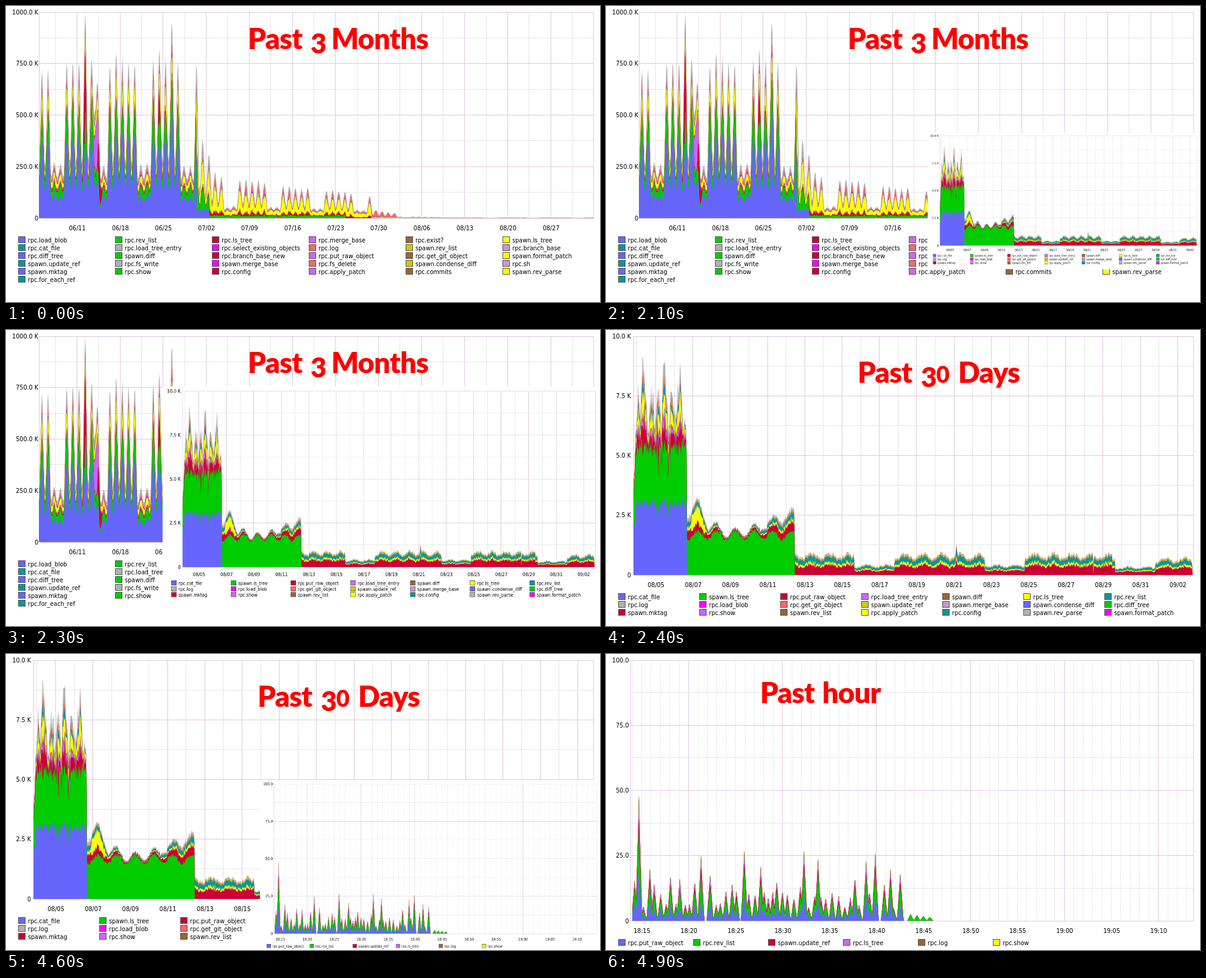
An HTML page with a canvas for the animation above (6.9 s loop, 975 by 487 pixels).

```html
<!DOCTYPE html>
<html lang="en">
<head>
<meta charset="utf-8">
<title>Call volume</title>
<style>
html, body { margin: 0; width: 100%; height: 100%; overflow: hidden; background: #fff; }
canvas { display: block; }
</style>
</head>
<body>
<canvas id="stage" width="975" height="487"></canvas>
<script>
const W = 975, H = 487, LOOP = 6900, RIGHT = 965, TOP = 10;
const C = {
  blue: '#6666ff', green: '#00cc00', crimson: '#cc0033', violet: '#cc66ff',
  brown: '#996633', yellow: '#ffff00', teal: '#009999', gray: '#b0b0b0',
  magenta: '#ff00ff', coral: '#ff6666', olive: '#cccc00', mauve: '#c898c8'
};
const CYCLE = Object.values(C);
const LAYERS = ['blue', 'green', 'crimson', 'violet', 'brown', 'yellow', 'teal', 'magenta', 'olive', 'coral', 'gray'];

function seeded(s) {
  return () => {
    s = (s + 0x6D2B79F5) | 0;
    let t = Math.imul(s ^ (s >>> 15), 1 | s);
    t = (t + Math.imul(t ^ (t >>> 7), 61 | t)) ^ t;
    return ((t ^ (t >>> 14)) >>> 0) / 4294967296;
  };
}

const bump = (x, c, w) => Math.max(0, 1 - Math.abs(x - c) / w);
const wave = (x, peak, period) => Math.cos((x - peak) / period * 2 * Math.PI);

// Piecewise linear curve through [x, y] pairs
function curve(pts, x) {
  let i = 1;
  while (i < pts.length - 1 && pts[i][0] < x) i++;
  const [x0, y0] = pts[i - 1], [x1, y1] = pts[i];
  return y0 + (y1 - y0) * Math.min(1, Math.max(0, (x - x0) / (x1 - x0)));
}

// Shares a total among named layers, each share jittered
function split(total, mix, rnd, jitter = 0.8) {
  const parts = {};
  let sum = 0;
  for (const name in mix) {
    const j = name === 'blue' ? jitter * 0.2 : jitter;
    sum += parts[name] = mix[name] * (1 + (rnd() - 0.5) * j);
  }
  for (const name in parts) parts[name] *= total / sum;
  return parts;
}

// rows: [x, heights]; the highest sums are painted first
function stack(g, rows, base) {
  const sums = rows.map(([x, h]) => [x, LAYERS.reduce((s, n) => s + (h[n] || 0), 0), h]);
  for (const name of [...LAYERS].reverse()) {
    g.beginPath();
    g.moveTo(rows[0][0], base);
    for (const row of sums) {
      g.lineTo(row[0], base - row[1]);
      row[1] -= row[2][name] || 0;
    }
    g.lineTo(rows[rows.length - 1][0], base);
    g.fillStyle = C[name];
    g.fill();
  }
}

function quarterRows() {
  const rnd = seeded(7), rows = [], size = 10.15;
  const level = [[0, 254], [20, 266], [25, 255], [26, 128], [28, 80], [30, 52], [32, 62], [53, 38], [54, 13], [58, 7], [59, 2.5], [68, 0.5]];
  const weekend = i => i % 7 === 2 || i % 7 === 3;
  const days = Array.from({ length: 92 }, (_, i) =>
    curve(level, i) * (weekend(i) ? 0.34 : 1) * (0.95 + rnd() * 0.1)
    + 80 * bump(i, 7, 1) + 55 * bump(i, 21, 1) + 135 * bump(i, 9, 1));
  const work = { blue: .52, green: .17, crimson: .02, violet: .01, brown: .025, yellow: .1, teal: .01, magenta: .01, coral: .04, gray: .1 };
  const rest = { blue: .44, green: .17, crimson: .03, violet: .02, brown: .03, yellow: .13, teal: .01, magenta: .03, coral: .05, gray: .1 };
  const july = { crimson: .08, brown: .04, yellow: .46, teal: .03, magenta: .02, coral: .13, gray: .12 };
  const late = { brown: .02, yellow: .12, teal: .06, coral: .6, gray: .06 };
  const tail = { yellow: .4, teal: .2, olive: .3, gray: .1 };

  for (let x = 54; x <= RIGHT; x++) {
    const t = (x - 59) / size, i = Math.max(0, Math.round(t)), f = t - i;
    const j = Math.max(0, i + (f < 0 ? -1 : 1));
    const low = Math.min(days[i], days[j]) * (weekend(i) || weekend(j) ? 0.75 : 0.36);
    const sharp = x < 320 ? 1.1 : 0.9;
    const h = (low + (days[i] - low) * Math.cos(Math.PI * f) ** (2 * sharp)) * (0.97 + rnd() * 0.06);
    let mix;
    if (x < 334) {
      mix = { ...(weekend(i) ? rest : work) };
      mix.crimson += 0.5 * bump(x, 129, 4) + 0.25 * bump(x, 251, 2) + bump(x, 154, 4);
      mix.violet += 0.8 * bump(x, 148, 5);
      if (x > 312) Object.assign(mix, { blue: 14 / h, green: .25, yellow: .3, gray: .2 });
    } else if (x < 600) {
      mix = { green: x < 558 ? 4 / h : 0, ...july };
    } else {
      mix = x < 642 ? late : tail;
    }
    rows.push([x, split(h, mix, rnd)]);
  }
  return rows;
}

function monthRows() {
  const rnd = seeded(23), rows = [], day = 30.6;
  const busy = { crimson: .28, violet: .1, brown: .06, yellow: .24, teal: .1, olive: .04, coral: .06, gray: .18 };
  const mid = { crimson: .38, brown: .03, yellow: .14, teal: .24, olive: .06, coral: .03, gray: .12 };
  const calm = { crimson: .46, brown: .02, yellow: .12, teal: .26, olive: .08, gray: .06 };
  const hill = [[133, 100], [151, 118], [167, 84], [205, 66], [232, 72], [309, 102]];

  for (let x = 45; x <= 963; x++) {
    let h;
    if (x < 133) {
      const edge = Math.min(1, 0.6 + (x - 45) / 14);
      const spikes = [60, 95, 123].reduce((s, c) => s + 85 * bump(x, c, 4), 0);
      const total = (275 + 25 * wave(x, 53, 11) + 50 * (rnd() - 0.5) + spikes) * edge - (x > 125 ? 55 : 0);
      const dip = rnd() < 0.06 ? 0.82 : 1;
      const blue = (108 + rnd() * 22) * edge * dip, green = (78 + rnd() * 26) * edge * dip;
      h = { blue, green, ...split(Math.max(20, total - blue - green), busy, rnd, 1) };
    } else if (x < 310) {
      const green = (66 + 7 * wave(x, 151, day)) * (0.95 + rnd() * 0.1);
      const total = (curve(hill, x) + 9 * wave(x, 151, day)) * (0.95 + rnd() * 0.1);
      const mix = x > 139 && x < 163 ? { ...mid, yellow: .9 } : mid;
      h = { green, ...split(Math.max(4, total - green), mix, rnd) };
    } else {
      const weekend = (x - 408) % 214 >= 0 && (x - 408) % 214 < 66;
      const total = (weekend ? 15 : 31) * (x > 830 ? 0.8 : 1) * (1 + 0.14 * wave(x, 582, day))
        * (0.87 + rnd() * 0.26) + 20 * bump(x, 575, 2);
      h = split(x === 800 || x > 962 ? 2 : total, calm, rnd, 0.5);
    }
    rows.push([x, h]);
  }
  return rows;
}

function hourRows() {
  const rnd = seeded(41), rows = [], unit = 4.29;
  const tall = [[54, 48], [72, 20], [156, 25], [227, 27], [254, 21], [325, 27], [348, 24], [427, 23], [442, 26], [467, 20], [483, 18]];
  const peaks = [];
  const add = (x, v, mix) => peaks.push({ x, v, mix });
  const mix = v => ({
    blue: .28 + rnd() * .18, green: .32 + rnd() * .1, crimson: .06 + rnd() * .08,
    violet: .06 + rnd() * .12, brown: .05, yellow: v > 19 ? .03 : 0
  });
  for (const [x, v] of tall) add(x, v, mix(v));
  for (let x = 47; x < 492; x += 6 + rnd() * 5) {
    if (tall.every(p => Math.abs(p[0] - x) > 5)) add(x, 5 + 13 * rnd() ** 1.6, mix(0));
  }
  for (let x = 500; x < 540; x += 10.5) add(x, 2.5 - (x - 500) / 30, { green: 1 });

  for (let x = 43; x < 540; x++) {
    const value = p => p.v * bump(x, p.x, 5.5);
    const top = peaks.reduce((a, b) => value(b) > value(a) ? b : a);
    rows.push([x, split(value(top) * unit, top.mix, rnd, 0)]);
  }
  return rows;
}

const DAY = 864e5;
const charts = [
  {
    left: 54, base: 349, x0: 116.5, step: 70.7, parts: 2, ticks: 12, tickY: 369,
    start: Date.UTC(2014, 5, 11), unit: 7 * DAY, right: 53,
    max: 1000, suffix: ' K', cols: 6, pitch: 159, keyY: 385, rows: quarterRows,
    legend: 'rpc.load_blob rpc.rev_list rpc.ls_tree rpc.merge_base rpc.exist? spawn.ls_tree ' +
      'rpc.cat_file rpc.load_tree_entry rpc.select_existing_objects rpc.log spawn.rev_list rpc.branch_base ' +
      'rpc.diff_tree spawn.diff rpc.branch_base_new rpc.put_raw_object rpc.get_git_object spawn.format_patch ' +
      'spawn.update_ref rpc.fs_write spawn.merge_base rpc.fs_delete spawn.condense_diff rpc.sh ' +
      'spawn.mktag rpc.show rpc.config rpc.apply_patch rpc.commits spawn.rev_parse rpc.for_each_ref'
  },
  {
    left: 45, base: 403, x0: 81.5, step: 61.2, parts: 2, ticks: 15, tickY: 423,
    start: Date.UTC(2014, 7, 5), unit: 2 * DAY, right: 41,
    max: 10, suffix: ' K', cols: 7, pitch: 133, keyY: 439, rows: monthRows,
    legend: 'rpc.cat_file spawn.ls_tree rpc.put_raw_object rpc.load_tree_entry spawn.diff rpc.ls_tree rpc.rev_list ' +
      'rpc.log rpc.load_blob rpc.get_git_object spawn.update_ref spawn.merge_base spawn.condense_diff rpc.diff_tree ' +
      'spawn.mktag rpc.show spawn.rev_list rpc.apply_patch rpc.config spawn.rev_parse spawn.format_patch'
  },
  {
    left: 40, base: 439, x0: 58.5, step: 77.1, parts: 5, every: 10, first: 5, ticks: 12, tickY: 459,
    start: Date.UTC(2014, 8, 2, 18, 15), unit: 3e5, clock: true, right: 37.5,
    max: 100, suffix: '', cols: 6, pitch: 123, keyY: 475, rows: hourRows,
    legend: 'rpc.put_raw_object rpc.rev_list spawn.update_ref rpc.ls_tree rpc.log rpc.show'
  }
];

const snap = v => Math.floor(v) + 0.5;

function line(g, x0, y0, x1, y1, color, dash = []) {
  g.strokeStyle = color;
  g.setLineDash(dash);
  g.beginPath();
  g.moveTo(x0, y0);
  g.lineTo(x1, y1);
  g.stroke();
  g.setLineDash([]);
}

function grid(g, c) {
  const MAJOR = '#dfc8df', MINOR = '#e6e6e6';
  const { left, base, x0, step, parts, every = parts, first = 0 } = c;
  for (let i = -parts; x0 + i * step / parts < RIGHT; i++) {
    const x = snap(x0 + i * step / parts), major = i % every === first;
    if (x > left) line(g, x, TOP, x, base, major ? MAJOR : MINOR, parts > 2 && !major ? [3, 1] : []);
  }
  for (let i = 0; i <= 8; i++) {
    const y = snap(TOP + (base - TOP) * i / 8);
    line(g, left, y, RIGHT, y, i % 2 ? MINOR : MAJOR);
  }
  for (const x of [left + 0.5, RIGHT - 0.5]) line(g, x, TOP, x, base, MAJOR);
}

function labels(g, c) {
  g.font = '9.6px "DejaVu Sans", sans-serif';
  g.fillStyle = '#000';
  g.textAlign = 'right';
  for (let i = 0; i <= 4; i++) {
    const s = i ? (c.max * i / 4).toFixed(1) + c.suffix : '0';
    g.fillText(s, c.right, c.base - (c.base - TOP) * i / 4 + 3.5);
  }
  g.textAlign = 'center';
  for (let i = 0; i < c.ticks; i++) {
    const iso = new Date(c.start + i * c.unit).toISOString();
    const s = c.clock ? iso.slice(11, 16) : iso.slice(5, 10).replace('-', '/');
    g.fillText(s, c.x0 + i * c.step + 0.5, c.tickY);
  }
  g.textAlign = 'left';
  c.legend.split(' ').forEach((s, i) => {
    const x = 20 + (i % c.cols) * c.pitch, y = c.keyY + Math.floor(i / c.cols) * 13;
    g.fillStyle = CYCLE[i % CYCLE.length];
    g.fillRect(x, y - 6, 12, 11);
    g.strokeStyle = '#555';
    g.strokeRect(x + 0.5, y - 5.5, 11, 10);
    g.fillStyle = '#000';
    g.fillText(s, x + 16, y + 4);
  });
}

function render(c) {
  const cv = document.createElement('canvas');
  cv.width = W;
  cv.height = H;
  const g = cv.getContext('2d');
  g.fillStyle = '#fff';
  g.fillRect(0, 0, W, H);
  grid(g, c);
  g.save();
  g.beginPath();
  g.rect(c.left, TOP, RIGHT - c.left, c.base - TOP);
  g.clip();
  stack(g, c.rows(), c.base);
  g.restore();
  labels(g, c);
  return cv;
}

// Words: [text, x, baseline, size]
const titles = [
  [['Past', 397, 71, 47], ['3', 500, 78, 45], ['Months', 534, 71, 47]],
  [['Past', 413, 87, 47], ['3', 517, 94, 45], ['0', 542, 87, 38], ['Days', 578, 87, 47]],
  [['Past', 253, 81, 47], ['hour', 355, 81, 47]]
];

const g = document.getElementById('stage').getContext('2d');
g.imageSmoothingQuality = 'high';
const plain = charts.map(render);

function show(i) {
  g.drawImage(plain[i], 0, 0);
  g.fillStyle = '#ff0000';
  g.letterSpacing = '-0.8px';
  for (const [s, x, y, size] of titles[i]) {
    g.font = `900 ${size}px Lato, sans-serif`;
    g.fillText(s, x, y);
  }
}

// The next chart grows out of the lower right corner in 100 ms steps
function grow(i, t, x, y, k, dx, dy, dk) {
  if (t < 0) return;
  const n = Math.floor(t / 100);
  g.drawImage(plain[i], x - n * dx, y - n * dy, W * (k + n * dk), H * (k + n * dk));
}

function draw(t) {
  if (t < 2400) {
    show(0);
    grow(1, t - 2000, 663, 267, 0.32, 135.5, 58, 0.139);
  } else if (t < 4900) {
    show(1);
    grow(2, t - 4400, 712.5, 356, 0.27, 148, 74, 0.152);
  } else {
    show(2);
  }
}

const began = performance.now();
function tick() {
  draw((performance.now() - began) % LOOP);
  requestAnimationFrame(tick);
}
tick();
</script>
</body>
</html>
```
